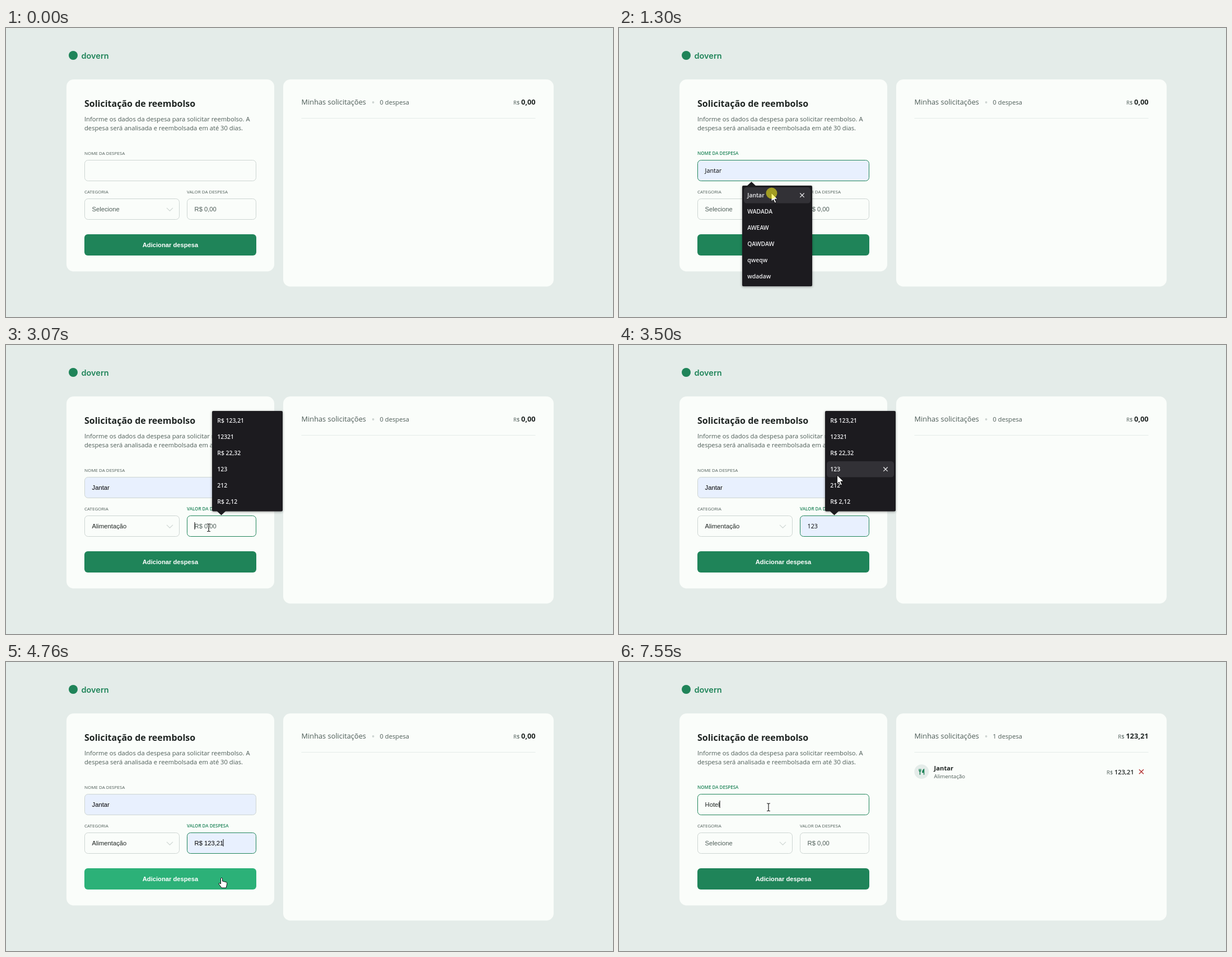
Animation, 1084 px wide and 517 px high, one loop 8 s. Source, as an HTML page with a canvas:

```html
<!DOCTYPE html>
<html lang="pt-BR">
<head>
<meta charset="utf-8">
<title>Reembolso</title>
<style>
html, body { margin: 0; width: 100%; height: 100%; overflow: hidden; background: #e4ece9; }
canvas { display: block; width: 1084px; height: 517px; }
</style>
</head>
<body>
<canvas id="stage" width="1084" height="517"></canvas>
<script>
const g = document.getElementById('stage').getContext('2d');
const LOOP = 8000;
const OPEN = '"Open Sans", "Noto Sans", sans-serif';
const ARIAL = '"Liberation Sans", Arial, sans-serif';
const C = {
  page: '#e4ece9', card: '#fafdfa', green: '#1f8459', hover: '#2cb178', dark: '#1f2523',
  mid: '#4d5c57', line: '#cdd5d2', fill: '#e8f0fe', pop: '#1c1b1f', row: '#323136', red: '#b12b2b'
};
const NAMES = ['Jantar', 'WADADA', 'AWEAW', 'QAWDAW', 'qweqw', 'wdadaw'];
const VALUES = ['R$ 123,21', '12321', 'R$ 22,32', '123', '212', 'R$ 2,12'];
const KINDS = ['Alimentação', 'Hospedagem', 'Serviços', 'Transporte', 'Outros'];

const NAME = [140, 236, 307, 38], CAT = [140, 305, 170, 38], VAL = [323, 305, 124, 38];
const BUTTON = [140, 369, 307, 38], LIST = [140, 343, 170, 98];
const POP_NAME = [220, 282, 125, 180], POP_VAL = [368, 118, 126, 179.5];

// start, end, from x/y, control x/y, to x/y
const MOVES = [
  [30, 560, 972, 520, 400, 440, 267, 258],
  [900, 1230, 267, 258, 268, 276, 273, 296],
  [1400, 1590, 273, 296, 255, 300, 238, 309],
  [1750, 2140, 238, 309, 240, 335, 234, 353],
  [2390, 2740, 234, 353, 380, 400, 362, 326],
  [3080, 3920, 362, 326, 395, 240, 410, 131],
  [4230, 4760, 410, 131, 425, 300, 385, 386],
  [5070, 5480, 385, 386, 390, 310, 267, 258]
];
const CLICKS = [[560, 700], [1270, 1400], [1590, 1680], [2250, 2390], [2740, 2890], [4090, 4230], [4930, 5070], [5490, 5660]];
const CARET_OFF = [[1060, 1590], [3250, 3750], [4250, 4750], [6140, 6340]];
const TYPED = [[6340, 'H'], [6670, 'Ho'], [7170, 'Hot'], [7450, 'Hote'], [7550, 'Hotel']];

const within = (t, a, b) => t >= a && t < b;
const any = (t, spans) => spans.some(s => within(t, s[0], s[1]));
const inside = (p, [x, y, w, h]) => within(p.x, x, x + w) && within(p.y, y, y + h);

function pointer(t) {
  const m = MOVES.filter(m => t >= m[0]).pop() || MOVES[0];
  const k = Math.min(1, Math.max(0, (t - m[0]) / (m[1] - m[0])));
  const e = m === MOVES[0] ? 1 - (1 - k) ** 2 : k * k * (3 - 2 * k);
  const mix = (a, b, c) => (1 - e) ** 2 * a + 2 * e * (1 - e) * b + e * e * c;
  return { x: mix(m[2], m[4], m[6]), y: mix(m[3], m[5], m[7]) + (t >= 5860 ? 1 : 0) };
}

function text(s, x, y, size, color, weight = 400, face = OPEN, align = 'left') {
  g.font = `${weight} ${size}px ${face}`;
  g.fillStyle = color;
  g.textAlign = align;
  g.fillText(s, x, y);
  return g.measureText(s).width;
}

function box([x, y, w, h], r, fill, stroke) {
  const o = stroke ? 0.5 : 0;
  g.beginPath();
  g.roundRect(x + o, y + o, w - 2 * o, h - 2 * o, r);
  g.fillStyle = fill;
  g.fill();
  if (stroke) { g.strokeStyle = stroke; g.lineWidth = 1; g.stroke(); }
}

function disc(x, y, r, fill) {
  g.beginPath();
  g.arc(x, y, r, 0, 7);
  g.fillStyle = fill;
  g.fill();
}

function path(d, x, y, fill, stroke, width = 1) {
  const p = new Path2D(d);
  g.save();
  g.translate(x, y);
  if (fill) { g.fillStyle = fill; g.fill(p); }
  if (stroke) { g.strokeStyle = stroke; g.lineWidth = width; g.stroke(p); }
  g.restore();
}

const cross = (x, y, r, color) => path(`M${-r} ${-r}L${r} ${r}M${r} ${-r}L${-r} ${r}`, x, y, null, color, 1.3);

function label(s, x, y, on) {
  text(s, x, y, 8, on ? C.green : C.mid, on ? 600 : 400);
}

function money(s, right, y, size, weight) {
  const w = text(s, right, y, size, C.dark, weight, OPEN, 'right');
  text('R$', right - w - 2.5, y, 9.6, C.mid, 400, OPEN, 'right');
}

function field(rect, s) {
  box(rect, 6, s.fill ? C.fill : C.card, s.focus ? C.green : C.line);
  const x = rect[0] + 13.6, y = rect[1] + 23;
  const w = s.preview ? text(s.text, x, y, 10.7, '#000') : text(s.text, x, y, 11.2, s.color, 400, ARIAL);
  if (s.caret) {
    g.fillStyle = '#000';
    g.fillRect(Math.round(x + (s.caretEnd ? w : 0)) - 0.5, rect[1] + 12, 1, 13);
  }
}

const rowAt = (p, rect) => inside(p, rect) ? Math.min(5, Math.max(0, Math.floor((p.y - rect[1] - 3) / 29))) : -1;

function popup(rect, items, hot, up) {
  const [x, y, w, h] = rect;
  g.save();
  g.shadowColor = 'rgba(0,0,0,.4)';
  g.shadowBlur = 4;
  g.shadowOffsetY = 1;
  box(rect, 2, C.pop);
  g.restore();
  path(up ? 'M-8 0.5L0 -7L8 0.5Z' : 'M-8 -0.5L0 7L8 -0.5Z', x + 16.5, up ? y : y + h, C.pop);
  items.forEach((s, i) => {
    const cy = y + 17.2 + 29 * i;
    if (i === hot) {
      box([x + 3, cy - 14.2, w - 6, 28.6], 5, C.row);
      cross(x + w - 18, cy, 3.7, '#e8e8ea');
    }
    text(s, x + 9.3, cy + 3.8, 10.4, '#ececee', 600);
  });
}

function list(p) {
  box(LIST, 0, '#fff', '#6f7674');
  const hot = inside(p, LIST) ? Math.floor((p.y - 344) / 19.3) : -1;
  KINDS.forEach((s, i) => {
    if (i === hot) { g.fillStyle = '#1967d2'; g.fillRect(141, 344 + 19.3 * i, 168, 19.3); }
    text(s, 153.6, 358 + 19.3 * i, 11.2, i === hot ? '#fff' : C.mid, 400, ARIAL);
  });
}

function cursor(p, kind) {
  if (kind === 'beam') {
    path('M-3 -6.5H-1L0 -5.5L1 -6.5H3M0 -5.5V6M-3 7H-1L0 6L1 7H3', p.x, p.y + 0.5, null, '#222', 1.2);
  } else if (kind === 'hand') {
    path('M-1.5 1Q0 -1 1.5 1V6L9 8Q10 9 9.5 12L8 18H0L-5 11Q-5 8 -1.5 11Z', p.x, p.y, '#fff', '#111');
  } else {
    path('M0 0V15.5L3.6 12.2L6.2 18L8.8 16.8L6.2 11.2H11.5Z', p.x - 1, p.y - 1, '#fff', '#111');
  }
}

function draw(t) {
  const p = pointer(t);
  const done = t >= 5070;
  const nameOn = within(t, 560, 1590) || done;
  const catOn = within(t, 1590, 2740), valOn = within(t, 2740, 4930);
  const popName = within(t, 560, 1400) || within(t, 5490, 6340);
  const popVal = within(t, 2740, 4230), listOn = within(t, 1590, 2390);
  const hotName = popName ? rowAt(p, POP_NAME) : -1;
  const hotVal = popVal ? rowAt(p, POP_VAL) : -1;
  const covered = hotName >= 0 || hotVal >= 0 || (listOn && inside(p, LIST));
  const over = rect => !covered && inside(p, rect);
  const caret = !any(t, CARET_OFF);

  g.fillStyle = C.page;
  g.fillRect(0, 0, 1084, 517);
  disc(120, 49, 8, C.green);
  text('dovern', 134.5, 54.5, 14.5, C.green, 600, 'Inter, sans-serif');
  box([108, 92, 371, 343.5], 12.8, C.card);
  box([495, 92, 483, 370.5], 12.8, C.card);

  text('Solicitação de reembolso', 140, 141, 16, C.dark, 700);
  text('Informe os dados da despesa para solicitar reembolso. A', 140, 167, 11.2, C.mid);
  text('despesa será analisada e reembolsada em até 30 dias.', 140, 182.5, 11.2, C.mid);
  label('NOME DA DESPESA', 140, 227, nameOn);
  label('CATEGORIA', 140, 296, catOn);
  label('VALOR DA DESPESA', 323, 296, valOn);

  const typed = (TYPED.filter(k => t >= k[0]).pop() || [0, ''])[1];
  const named = within(t, 1400, 5070);
  field(NAME, {
    text: hotName >= 0 ? NAMES[hotName] : named ? NAMES[0] : typed,
    preview: hotName >= 0, fill: hotName >= 0 || named, focus: nameOn,
    color: named ? '#000' : C.dark, caret: nameOn && caret, caretEnd: hotName < 0
  });
  const chosen = within(t, 2390, 5070);
  field(CAT, { text: chosen ? KINDS[0] : 'Selecione', color: chosen ? C.dark : C.mid, focus: catOn });
  path('M-5.5 -2.7L0 2.7L5.5 -2.7', 292.5, 324.5, null, C.line, 1.1);
  const valued = within(t, 4230, 5070);
  field(VAL, {
    text: hotVal >= 0 ? VALUES[hotVal] : valued ? VALUES[0] : 'R$ 0,00',
    preview: hotVal >= 0, fill: hotVal >= 0 || valued, focus: valOn,
    color: valued ? '#000' : C.mid, caret: valOn && caret, caretEnd: valued
  });
  box(BUTTON, 6, over(BUTTON) ? C.hover : C.green);
  text('Adicionar despesa', 293.5, 392, 11.2, '#fff', 700, ARIAL, 'center');

  text('Minhas solicitações', 527.5, 137.3, 12.8, C.mid);
  disc(655.7, 133, 1.9, C.line);
  text(done ? '1 despesa' : '0 despesa', 667.5, 137, 11.2, C.mid);
  money(done ? '123,21' : '0,00', 945.5, 137.3, 12.8, 700);
  g.fillStyle = C.page;
  g.fillRect(527.5, 161, 418, 1);
  if (done) {
    disc(540.3, 196.2, 12.9, C.page);
    path('M-5 -5H-4V-2H-3.3V-5H-2.3V-2H-1.6V-5H-0.6V-1.5L-2 0.3V5.5H-3.6V0.3L-5 -1.5ZM5 -5.5V5.5H3.6V2H0.8Q0.8 -4 5 -5.5Z', 540.3, 196.2, C.green);
    text('Jantar', 562.6, 193.5, 11.2, C.dark, 700);
    text('Alimentação', 562.6, 207.5, 9.6, C.mid);
    money('123,21', 919.6, 201, 11.2, 600);
    cross(932.8, 196.3, 4, C.red);
  }

  if (listOn) list(p);
  if (popName) popup(POP_NAME, NAMES, hotName, true);
  if (popVal) popup(POP_VAL, VALUES, hotVal, false);

  if (t >= 30) {
    cursor(p, over(NAME) || over(VAL) ? 'beam' : over(BUTTON) ? 'hand' : 'arrow');
    if (any(t, CLICKS)) disc(p.x - 0.5, p.y - 0.5, 10, 'rgba(255,245,20,.55)');
  }
}

function tick(now) {
  draw(now % LOOP);
  requestAnimationFrame(tick);
}
draw(0);
requestAnimationFrame(tick);
</script>
</body>
</html>
```
